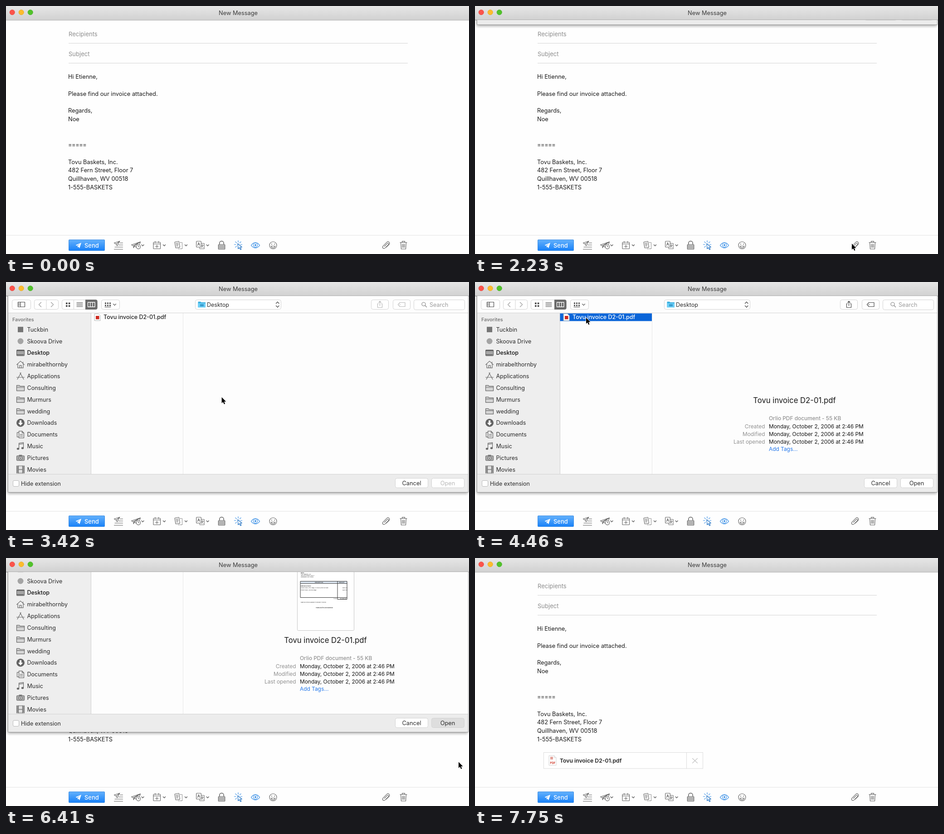
An HTML page for the animation above (8.5 s loop, 1021x549 px).

```html
<!DOCTYPE html>
<html lang="en">
<head>
<meta charset="utf-8">
<title>Attach a file</title>
<style>
html, body { margin: 0; width: 100%; height: 100%; overflow: hidden; background: #fefefe; }
svg { display: block; width: 100vw; height: 100vh; font: 12.5px Inter, Roboto, sans-serif; }
.mail text { font-size: 12.8px; fill: #1a1a1a; }
.mail .hint { font-size: 13px; fill: #8c8c8c; }
.line { fill: none; stroke-linecap: round; stroke-linejoin: round; }
.tools { stroke: #666; stroke-width: 1.15; }
.blue { stroke: #3b90e6; }
.box { fill: #fff; stroke: #d3d3d3; }
#sheet { --ink: #2e2e2e; --ui: #484848; --act: #484848; --open: #2e2e2e; --arrow: #a6a6a6;
  --side: #eee; --mark: none; --seg: #6a6a6a; --segInk: #fff; --file: #fff; }
#sheet.idle { --act: #b9b9b9; --open: #b9b9b9; --file: #222; }
#sheet.loading { --ink: #b5b5b5; --ui: #a9a9a9; --act: #a9a9a9; --open: #c4c4c4; --arrow: #8c8c8c;
  --side: #fcfcfc; --mark: #c9c9c9; --seg: #e3e3e3; --segInk: #858585; }
.ui { stroke: var(--ui); stroke-width: 1.2; }
.act { stroke: var(--act); stroke-width: 1.2; }
.rows { fill: #2b2b2b; }
.icon { stroke: #686868; stroke-width: 1.2; }
.info { font-size: 11.9px; }
.grey { fill: #929292; }
.tiny text { font-size: 2.7px; fill: #333; }
</style>
</head>
<body>
<svg id="stage" viewBox="0 0 1021 549" preserveAspectRatio="none" xmlns="http://www.w3.org/2000/svg"></svg>
<script>
const LOOP = 8500, FILE = 'Tovu invoice D2-01.pdf';

const text = (x, y, s, attrs = '') => `<text x="${x}" y="${y}" ${attrs}>${s}</text>`;
const rect = (x, y, w, h, attrs = '') => `<rect x="${x}" y="${y}" width="${w}" height="${h}" ${attrs}/>`;
const circle = (x, y, r, attrs = '') => `<circle cx="${x}" cy="${y}" r="${r}" ${attrs}/>`;
const line = (d, cls = '', attrs = '') => `<path class="line ${cls}" d="${d}" ${attrs}/>`;
const solid = (d, fill) => `<path d="${d}" fill="${fill}"/>`;
const range = n => [...Array(n).keys()];
const box = (x, y, w, h, attrs = '') => rect(x + .5, y + .5, w, h, `class="box" rx="4" ${attrs}`);

function titleBar() {
  const lights = [['#fb544b', '#ea463f'], ['#fcbc2d', '#e6a825'], ['#52c22b', '#43b124']];
  return rect(0, 0, 1021, 31, 'fill="url(#bar)"') + rect(0, 31, 1021, 1, 'fill="#b3b3b3"') +
    lights.map(([f, s], i) => circle(13.7 + 20 * i, 14, 5.6, `fill="${f}" stroke="${s}" stroke-width=".8"`)).join('') +
    text(512, 19.7, 'New Message', 'text-anchor="middle" font-size="12.8" fill="#3c3c3c"');
}

function message() {
  const lines = { 0: 'Hi Etienne,', 2: 'Please find our invoice attached.', 4: 'Regards,', 5: 'Noe',
    10: 'Tovu Baskets, Inc.', 11: '482 Fern Street, Floor 7', 12: 'Quillhaven, WV 00518', 13: '1-555-BASKETS' };
  return '<g class="mail">' +
    text(138, 66.7, 'Recipients', 'class="hint"') + text(138, 111, 'Subject', 'class="hint"') +
    rect(138, 82, 748, 1, 'fill="#d5d5d5"') + rect(138, 126, 748, 1, 'fill="#d5d5d5"') +
    Object.entries(lines).map(([n, s]) => text(137, 161 + 18.85 * n, s)).join('') +
    text(137, 312.3, '=====', 'letter-spacing="-.4"') + '</g>';
}

function chip() {
  return '<g id="chip">' + rect(151.5, 430.5, 351, 35.5, 'fill="#fff" stroke="#dcdcdc"') +
    line('M466.5 431V466', '', 'stroke="#dcdcdc"') +
    line('M479.5 443.5L490.5 454M490.5 443.5L479.5 454', '', 'stroke="#c2c2c2" stroke-width="1.1"') +
    line('M163.5 437.5H174.5L179 442V459H163.5Z M174.5 437.5V442H179', '', 'stroke="#d2d2d2"') +
    rect(166, 440, 6, 6, 'fill="#e3a39b"') +
    text(171.4, 455.6, 'PDF', 'text-anchor="middle" font-size="6" font-weight="700" fill="#cf3a2c"') +
    text(187, 453, FILE, 'font-size="12.2" font-weight="600" fill="#222"') + '</g>';
}

function mailTools() {
  const chevron = x => line(`M${x - 2.5} 528.5l2.5 2.6l2.5 -2.6`, '', 'stroke-width="1.5"');
  const pointer = 'M511 526L512 537.5L514.7 535L517 539.5L518.8 538.5L516.7 534.2L520.3 533.7Z';
  const rays = range(7).map(i => {
    const a = (i * 45 + 90) * Math.PI / 180, p = r => `${512 + r * Math.cos(a)} ${528 + r * Math.sin(a)}`;
    return `M${p(5)}L${p(8.7)}`;
  }).join('');
  return rect(0, 507, 1021, 42, 'fill="#fefefe"') + rect(0, 507, 1021, 1, 'fill="#e3e3e3"') +
    rect(138, 517, 80, 25, 'rx="2" fill="#3a8ce4"') + rect(139, 518, 78, 23, 'rx="1.5" fill="url(#send)"') +
    solid('M153.5 529.3L166 524L162.2 536.2L159.3 532.4L157.8 535V531.3L163.2 526.5L156.3 530.7Z', '#fff') +
    text(173, 534.5, 'Send', 'font-size="12.9" font-weight="500" fill="#fff"') +
    '<g class="line tools">' +
    line('M238.5 524.5L251 520.5L245 531L243 527Z M243 527L251 520.5 M251.5 524.5H257.5 M248.5 529H257.5 M240 533.7H257.5 M238.5 538.5H257.5') +
    line('M287 534L283 531.2L281.3 535.5L280.5 530.5L276.5 528.7L296.5 522L294.5 527.5 M280.5 530.5L296.5 522L283 531.2') +
    circle(292, 533, 4.6) + line('M292 530.5V533H294') + chevron(301.5) +
    rect(325, 523, 15.5, 14.5, 'rx="1"') + line('M325 526.7H340.5 M329 520.8V524 M336.5 520.8V524 M332.8 529V535.5 M329.5 532.2H336') + chevron(349) +
    '<g transform="rotate(-9 378 528)">' + rect(373, 521.5, 9.5, 13.5, 'rx="1"') + line('M375.5 525H380 M375.5 528H380 M375.5 531H379') + '</g>' +
    line('M384.5 523.5H388.5V537.5H378.5', '', 'stroke-dasharray="1.5 1.7" stroke-width="1"') + chevron(397) +
    rect(419.7, 520.7, 10.6, 13, 'rx="1"') + line('M422.5 530.2L425 523.8L427.5 530.2 M423.4 528H426.6') +
    line('M430.5 525.5H437.3V537.5H427V534 M431 529.5H436 M433.5 528V529.5 M435 529.5L431 535 M432 531L435.5 535', '', 'stroke-width=".9"') + chevron(444.7) +
    line('M470.8 528V525a4.7 4.4 0 0 1 9.4 0V528', '', 'stroke-width="1.5"') +
    rect(468.3, 528, 14.5, 10.5, 'rx="1" fill="#d6d6d6"') + line('M469 530.7H482 M469 533.3H482 M469 535.9H482', '', 'stroke-width=".8"') +
    line(rays, 'blue') + solid(pointer, '#fefefe') + line(pointer, 'blue') +
    line('M540.5 529.8Q550 517.5 559.5 529.8Q550 541.5 540.5 529.8Z', 'blue') + circle(550, 529.3, 4.6, 'class="blue"') +
    circle(550, 529.3, 2, 'fill="#3b90e6" stroke="none"') +
    circle(589, 529.7, 8) + line('M584.3 531.5H593.7Q592.5 535.5 589 535.5Q585.5 535.5 584.3 531.5Z') +
    circle(586, 527.3, 1, 'fill="#666" stroke="none"') + circle(592, 527.3, 1, 'fill="#666" stroke="none"') +
    line('M834.5 532L840.8 525.7Q842.5 524.3 843.6 525.8Q844.5 527.2 843 528.6L835.7 535.8Q833.3 538 831.3 536Q829.3 533.8 831.5 531.3L840 522.7Q842.3 520.6 844.6 522.7Q847 525.2 844.7 528L838.5 534') +
    line('M869 523.5H884 M873.5 523.3V520.8H879.5V523.3 M870.5 523.5L871.5 538H881.5L882.5 523.5 M874 527V534.5 M876.5 527V534.5 M879 527V534.5') +
    '</g>';
}

// Sidebar icons are drawn around x = 32, y = 0.
const folder = line('M23.5 6.5V-5.5H29.5L31 -3.7H40.5V6.5Z M23.5 -1.3H40.5', 'icon', 'style="fill:#d5d5d5"');
const badge = rect(26, -6, 12, 12, 'fill="#757575"');
const entries = [
  ['Tuckbin', badge],
  ['Skoova Drive', circle(32, 0, 6.5, 'fill="#a4a4a4"')],
  ['Desktop', rect(23.5, -6.5, 17, 13, 'fill="#a6a6a6" stroke="#5c5c5c" rx="1"') + rect(24, -6, 16, 2, 'fill="#5c5c5c"') + line('M25 4.3H39', '', 'stroke="#444" stroke-width="1.6" stroke-dasharray="1 2"')],
  ['mirabelthornby', line('M23.5 .5L32 -7.5L40.5 .5 M37.5 -5.5V-2.5 M26 -1.5V7.5H38V-1.5 M30 7.5V2H34V7.5', 'icon')],
  ['Applications', line('M25 7L33 -7.5 M31 -7.5L39 7 M23.5 2.5H40.5', 'icon', 'stroke-width="1.8"')],
  ['Consulting', folder], ['Murmurs', folder], ['wedding', folder],
  ['Downloads', circle(32, 0, 9, 'fill="#636363"') + solid('M30 -5.5H34V0H37.3L32 6L26.7 0H30Z', '#fff')],
  ['Documents', line('M28 -4.5H24.5V5.5H28 M28.5 -7.5H35.5L39.5 -3.5V7.5H28.5Z M35.5 -7.5V-3.5H39.5 M31 0H37 M31 3.5H37', 'icon')],
  ['Music', line('M28.5 5V-6.5L38.5 -8V3.5 M28.5 -4L38.5 -5.5', 'icon') + '<g fill="#686868"><ellipse cx="26.5" cy="5.8" rx="2.7" ry="2.2"/><ellipse cx="36.5" cy="4.3" rx="2.7" ry="2.2"/></g>'],
  ['Pictures', rect(23.5, -4.5, 17, 10.5, 'rx="1" fill="#a8a8a8" stroke="#686868"') + rect(28.5, -6.5, 7, 2, 'fill="#686868"') + circle(32, .8, 3.8, 'fill="#ddd" stroke="#555"') + circle(32, .8, 1.5, 'fill="#555"')],
  ['Movies', rect(23.5, -8, 17, 16, 'fill="#e2e2e2" stroke="#686868"') + line('M27.5 -8V8 M36.5 -8V8 M27.5 0H36.5', 'icon') + line('M25.5 -6V7 M38.5 -6V7', '', 'stroke="#686868" stroke-width="2" stroke-dasharray="1.5 2"')],
  ['Tuckbin (Old)', folder], ['Quovel Drive', folder]
];

function sidebar() {
  const rows = entries.map(([name, icon], i) =>
    `<g transform="translate(0 ${105.2 + 25.82 * i})">` +
    (name === 'Desktop' ? rect(5, -12, 182, 24, 'style="fill:var(--mark)"') : '') + icon +
    text(46.5, 4.6, name, name === 'Desktop' ? 'font-weight="500" fill="#111"' : '') + '</g>').join('');
  return rect(5, 69, 182, 356, 'style="fill:var(--side)"') +
    `<g clip-path="url(#side)"><g id="rows" class="rows">` +
    text(14, 87.3, 'Favorites', 'font-size="10.7" font-weight="600" fill="#7b7b7b"') + rows + '</g></g>';
}

function sheetBar() {
  const dots = (x, w, cols, rows, gap) => range(cols * rows).map(i =>
    rect(x + gap * (i % cols), 45.5 + gap * Math.floor(i / cols), w, w, 'style="fill:var(--ui)"')).join('');
  return box(13, 39, 41, 21) + line('M26.5 44.5H41.5V55H26.5Z M32 44.5V55 M28 47H30 M28 49.5H30 M28 52H30', 'ui') +
    box(62, 39, 53, 21) + line('M89 40V60', '', 'stroke="#d3d3d3"') +
    line('M77.5 45L72.5 50L77.5 55 M99.5 45L104.5 50L99.5 55', '', 'style="stroke:var(--arrow)" stroke-width="1.5"') +
    box(123, 39, 78, 21) + line('M149.5 40V60', '', 'stroke="#d3d3d3"') +
    `<path d="M175 39H197.5a4 4 0 0 1 4 4V57a4 4 0 0 1 -4 4H175Z" style="fill:var(--seg)"/>` +
    dots(132, 3.6, 2, 2, 5.8) + line('M156 45.5H169 M156 48.5H169 M156 51.5H169 M156 54.5H169', 'ui') +
    line('M180.5 45H196V55H180.5Z M185.7 45V55 M190.8 45V55', '', 'style="stroke:var(--segInk)" stroke-width="1.3"') +
    box(210, 39, 40, 21) + dots(218, 3, 3, 2, 5) + line('M218 55.5H231', 'ui') + line('M236.5 48.7L239.5 51.7L242.5 48.7', 'ui') +
    box(417, 39, 189, 21) + solid('M423.5 56V43.5H429L430.5 45H440V56Z', '#35aee0') + solid('M423.5 47H440V56.5H423.5Z', '#6dcff6') + rect(428, 49, 8, 5, 'fill="#3c9fd0"') +
    text(443, 54.5, 'Desktop', 'style="fill:var(--ink)"') +
    line('M595.5 47.5L598.8 44L602 47.5 M595.5 52.5L598.8 56L602 52.5', 'ui', 'stroke-width="1.5"') +
    box(805, 39, 38, 21) + line('M821.5 48H819.5V56.5H829.5V48H827.5 M824.5 52.5V42.7 M821.7 45.3L824.5 42.5L827.3 45.3', 'act') +
    box(853, 39, 38, 21) + line('M864.5 50L868.5 45.5H880V54.5H868.5Z', 'act') + circle(868.7, 50, .9, 'style="fill:var(--act)"') +
    box(899, 39, 112, 22) + circle(921, 49, 4, 'fill="none" stroke="#858585" stroke-width="1.2"') + line('M924 52L927.5 55.5', '', 'stroke="#858585" stroke-width="1.3"') +
    text(934, 54.5, 'Search', 'fill="#9c9c9c"');
}

function invoice() {
  const page = rect(642.5, 79.5, 125, 161, 'rx="2" fill="#fff" stroke="#c6c6c6"');
  const notes = [
    [650, 96.5, 'Writing and editing services for small firms', 700], [650, 102, '27 Fern Avenue, Suite 2'], [650, 105, 'Quillhaven, WV 00518'], [650, 108, '555 000 0000'],
    [722, 101.5, 'Date:', 700], [735, 101.5, 'October 2, 2006'], [722, 104.5, 'Invoice #', 700], [735, 104.5, 'D2-01'], [735, 107.5, 'For: Editing'],
    [650, 114, 'Bill to:', 700], [650, 117, 'Tovu Baskets, Inc.'], [650, 120, '482 Fern Street, Floor 7'], [650, 123, 'Quillhaven, WV 00518'],
    [681, 135, 'DESCRIPTION', 700], [734, 135, 'AMOUNT', 700], [650, 142.5, 'Editorial services', 700], [650, 147, 'Project work, first stage, 12 hours at the set rate'],
    [742, 147, '$600.00'], [650, 152, 'Project work, second stage'], [742, 152, '$600.00'], [722, 171, 'TOTAL'], [737, 171, '$1,200.00', 700],
    [650, 179, 'Make all checks payable to Mirabel Thornby'], [683, 191, 'Thank you for your business!', 700]
  ];
  return '<g id="invoice" class="tiny">' + page +
    `<g font-weight="700">${text(650, 92.5, 'Mirabel Thornby', 'style="font-size:4.6px;fill:#111"')}${text(722, 92.5, 'INVOICE', 'style="font-size:6.4px;fill:#c9d6e4"')}</g>` +
    rect(649.5, 131.5, 102.5, 5, 'fill="#dce6f1"') + line('M649.5 131.5H752V167.5H649.5Z M649.5 136.3H752 M731 131.5V171.5H752V167.5', '', 'stroke="#222" stroke-width=".9"') +
    notes.map(([x, y, s, w = 400]) => text(x, y, s, `font-weight="${w}"`)).join('') + '</g>';
}

function preview() {
  const date = 'Monday, October 2, 2006 at 2:46 PM';
  return '<g id="preview">' + text(704.5, 268, FILE, 'text-anchor="middle" font-size="16.7" fill="#151515"') +
    '<g class="info">' + text(648, 305.6, 'Orlio PDF document - 55 KB', 'class="grey" font-weight="500"') +
    ['Created', 'Modified', 'Last opened'].map((s, i) =>
      text(639.5, 323.7 + 17 * i, s, 'class="grey" text-anchor="end"') + text(648, 323.7 + 17 * i, date, 'fill="#151515"')).join('') +
    text(648, 374.3, 'Add Tags…', 'fill="#2477ea"') + '</g></g>';
}

function sheet() {
  const shadow = range(6).map(i =>
    rect(i * .8, -60, 1021 - i * 1.2, 533.5 - i * 1.4, `rx="7" fill="#000" opacity="${.025 + .012 * i}"`)).join('');
  return `<g clip-path="url(#below)"><g id="sheet">` + shadow +
    rect(4.5, -60, 1015, 525, 'fill="#fdfdfd" stroke="#a9a9a9"') + rect(5, 465, 1014, 1, 'fill="#999"') +
    sidebar() + rect(5, 68, 1014, 1, 'fill="#d3d3d3"') + sheetBar() +
    rect(187, 69, 1, 356, 'fill="#cfcfcf"') + rect(390, 69, 1, 356, 'fill="#e6e6e6"') +
    '<g id="file">' + rect(187.5, 69.5, 202.5, 17, 'id="pick" fill="#0a65d8"') +
    line('M195.5 70.5H204L208 74.5V85.5H195.5Z', '', 'stroke="#b5b5b5" style="fill:#fff"') + rect(198, 75, 7.5, 7.5, 'fill="#cf2a20"') +
    text(215, 82.4, FILE, 'font-weight="500" style="fill:var(--file)"') + '</g>' + preview() + invoice() +
    rect(5, 425, 1014, 40, 'fill="#ececec"') + rect(5, 425, 1014, 1, 'fill="#d2d2d2"') +
    rect(15.5, 439.5, 13, 13, 'rx="2.5" fill="#fff" stroke="#b9b9b9"') + text(33, 450.8, 'Hide extension', 'fill="#2b2b2b"') +
    box(858, 434, 72, 21) + text(894.5, 449.7, 'Cancel', 'text-anchor="middle" font-size="12.8" style="fill:var(--ink)"') +
    box(938, 434, 72, 21, 'id="open"') + text(974, 449.7, 'Open', 'text-anchor="middle" font-size="12.8" style="fill:var(--open)"') +
    '</g></g>' + rect(0, 30, 1021, 1, 'id="slot" fill="#b0b0b0"');
}

const stage = document.getElementById('stage');
stage.innerHTML = `<defs>
  <linearGradient id="bar" x2="0" y2="1"><stop stop-color="#e6e6e6"/><stop offset="1" stop-color="#d1d1d1"/></linearGradient>
  <linearGradient id="send" x2="0" y2="1"><stop stop-color="#62b0fc"/><stop offset="1" stop-color="#1a82f8"/></linearGradient>
  <clipPath id="below">${rect(0, 30, 1021, 519)}</clipPath>
  <clipPath id="side">${rect(5, 69, 182, 356)}</clipPath></defs>` +
  rect(0, 0, 1021, 549, 'fill="#fefefe"') + message() + chip() + mailTools() + titleBar() + sheet() +
  `<path id="cursor" d="M0 0V13.4L3 10.6L5.3 15.6L7.5 14.7L5.3 9.8H9.5Z" fill="#000" stroke="#fff" stroke-width="1.6" paint-order="stroke"/>`;

const el = id => document.getElementById(id);
const show = (id, on) => el(id).setAttribute('display', on ? 'inline' : 'none');
const ease = p => p * p * (3 - 2 * p);

// Each glide advances in a fixed number of visible steps.
const glides = [
  { start: 1190, end: 1490, steps: 3, from: [831, 549], to: [831, 526] },
  { start: 2980, end: 3860, steps: 7, from: [831, 526], to: [245, 79] },
  { start: 5060, end: 5810, steps: 6, from: [245, 79], to: [998, 451.5] },
  { start: 7600, end: 7750, steps: 2, from: [998, 451.5], to: [998, 573] }
];

function cursorAt(t) {
  const g = glides.filter(g => t >= g.start).pop();
  if (!g) return [831, 560];
  const beat = (g.end - g.start) / (g.steps - 1);
  const p = ease(Math.min(g.steps, Math.floor((t - g.start) / beat + 1e-6) + 1) / g.steps);
  return g.from.map((a, i) => a + (g.to[i] - a) * p);
}

const drops = [[2230, -424], [2380, -170], [2530, 0], [6410, -80], [6560, -356.5]];

function draw(t) {
  const open = t >= 2230 && t < 6710, loading = t < 2680, picked = t >= 4460;
  show('sheet', open);
  show('slot', open);
  if (open) {
    const [, dy] = drops.filter(d => t >= d[0]).pop();
    el('sheet').setAttribute('transform', `translate(0 ${dy})`);
    el('sheet').setAttribute('class', loading ? 'loading' : picked ? '' : 'idle');
    el('rows').setAttribute('transform', `translate(0 ${loading ? -37.6 : 0})`);
    el('open').style.fill = t >= 6260 ? '#dedede' : '#fff';
  }
  show('file', !loading);
  show('pick', picked);
  show('preview', picked);
  show('invoice', t >= 4610);
  show('chip', t >= 6850);
  el('cursor').setAttribute('transform', `translate(${cursorAt(t)})`);
}

const begin = performance.now();
function tick() {
  draw((performance.now() - begin) % LOOP);
  requestAnimationFrame(tick);
}
draw(0);
requestAnimationFrame(tick);
</script>
</body>
</html>
```
